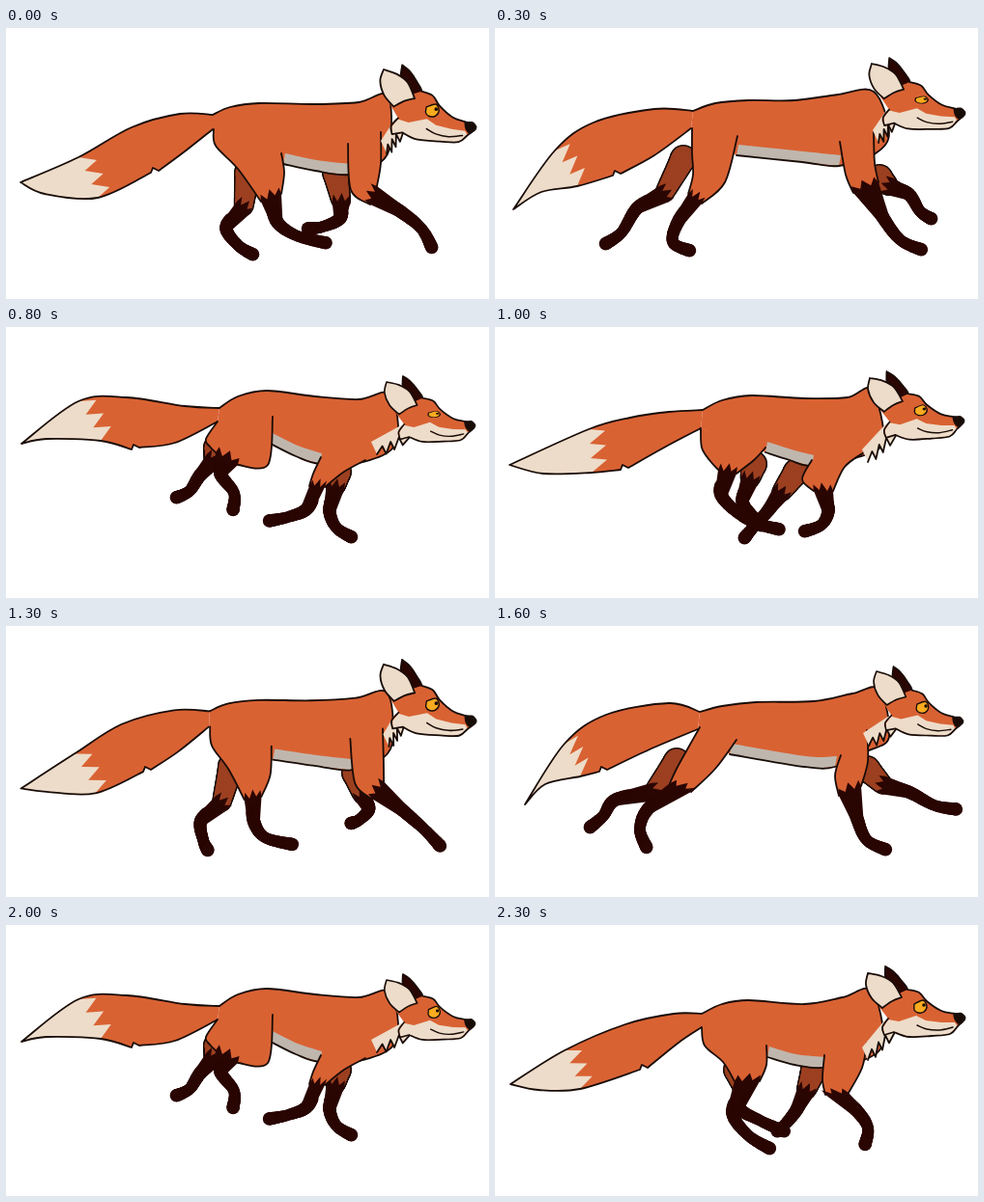
An HTML page with a canvas for the animation above (2.4 s loop, 500 by 281 pixels).

```html
<!DOCTYPE html>
<html lang="en">
<head>
<meta charset="utf-8">
<title>Running fox</title>
<style>
html, body { margin: 0; width: 100%; height: 100%; overflow: hidden; background: #fff; }
canvas { display: block; width: 500px; height: 281px; }
</style>
</head>
<body>
<canvas id="stage"></canvas>
<script>
const W = 500, H = 281, STEP = 100, FRAMES = 24, CYCLE = 12;
const ORANGE = '#d96233', BROWN = '#9c4021', DARK = '#2a0603', CREAM = '#eddcc9',
      GREY = '#bfb7ae', YELLOW = '#fbab1f', INK = '#190c07';
const canvas = document.getElementById('stage');
const ctx = canvas.getContext('2d');
const ratio = window.devicePixelRatio || 1;
canvas.width = W * ratio;
canvas.height = H * ratio;

// Key poses of one stride; "at" is the step within the stride.
// head: ear tip, nose tip. Legs: joints from the top down.
const poses = [
  { at: 0,
    tail: [214,90, 180,89, 130,103, 75,134, 15,160, 40,172, 95,176, 150,150, 185,128, 214,105],
    body: [232,82, 262,78, 320,79, 365,77, 395,70, 398,118, 387,140, 355,152, 320,148, 287,141],
    thigh: [215,105, 217,122, 240,146, 264,180, 285,172, 288,150, 285,130],
    arm: [388,108, 388,140, 384,164, 377,183, 357,168, 354,120],
    hind: [280,200, 300,215, 332,223], fore: [408,190, 430,208, 441,228],
    hind2: [250,150, 246,186, 228,206, 240,225, 256,235],
    fore2: [341,150, 347,180, 346,197, 328,206, 312,208],
    head: [391,43, 486,103], ruff: [394,130] },
  { at: 3,
    tail: [205,86, 165,84, 102,98, 62,127, 19,188, 48,170, 85,164, 122,153, 165,132, 203,104],
    body: [228,78, 262,75, 310,75, 355,69, 392,66, 408,108, 394,130, 356,143, 318,139, 250,132],
    thigh: [204,104, 204,130, 205,152, 200,172, 214,182, 238,160, 251,112],
    arm: [392,108, 393,140, 397,160, 371,171, 363,152, 357,118],
    hind: [190,200, 184,222, 202,231], fore: [402,197, 420,220, 442,230],
    hind2: [195,135, 175,172, 148,186, 131,212, 114,224],
    fore2: [398,155, 408,164, 428,172, 440,190, 452,198],
    head: [390,37, 486,88], ruff: [397,119] },
  { at: 4,
    tail: [212,89, 180,80, 115,92, 72,122, 31,185, 52,164, 88,156, 108,151, 160,128, 210,107],
    body: [235,83, 270,79, 330,78, 370,70, 398,66, 408,115, 385,130, 352,146, 320,146, 243,133],
    thigh: [212,105, 199,128, 188,148, 181,163, 203,172, 228,148, 250,118],
    arm: [385,108, 386,140, 379,166, 356,176, 352,155, 358,134],
    hind: [160,188, 150,210, 157,230], fore: [375,200, 385,222, 405,232],
    hind2: [188,140, 164,172, 125,180, 112,197, 98,209],
    fore2: [385,148, 402,165, 428,172, 455,186, 478,190],
    head: [395,47, 484,99], ruff: [387,124] },
  { at: 6,
    tail: [215,72, 175,69, 115,68, 68,92, 16,147, 45,145, 95,128, 115,120, 160,99, 200,92],
    body: [228,68, 260,64, 310,66, 355,70, 388,68, 402,112, 385,125, 325,138, 290,128, 248,118],
    thigh: [200,93, 191,118, 184,136, 160,143, 165,157, 215,150, 254,106],
    arm: [388,120, 360,135, 329,160, 307,160, 318,146, 328,122],
    hind: [140,156, 118,175, 90,178], fore: [300,190, 296,210, 310,226],
    hind2: [190,122, 178,133, 152,138, 130,153, 113,160],
    fore2: [372,140, 382,165, 405,185, 430,208, 447,220],
    head: [385,57, 484,101], ruff: [385,124] },
  { at: 8,
    tail: [221,84, 185,82, 125,73, 75,77, 16,121, 42,116, 98,118, 130,127, 175,120, 219,98],
    body: [240,72, 270,66, 320,72, 365,75, 398,70, 404,120, 370,140, 325,142, 300,134, 272,120],
    thigh: [219,98, 207,116, 211,124, 217,130, 240,143, 271,143, 276,93],
    arm: [372,138, 350,150, 330,166, 314,165, 318,152, 326,135],
    hind: [222,152, 236,172, 235,190], fore: [312,188, 292,197, 272,201],
    hind2: [218,125, 215,138, 200,155, 190,170, 176,177],
    fore2: [344,150, 341,166, 335,190, 342,208, 358,218],
    head: [394,57, 485,102], ruff: [384,132] },
  { at: 10,
    tail: [215,86, 180,88, 140,94, 97,106, 15,143, 50,152, 100,151, 130,148, 175,125, 213,105],
    body: [235,76, 265,71, 320,74, 365,73, 390,65, 402,118, 376,135, 328,144, 305,138, 280,130],
    thigh: [213,105, 214,125, 222,138, 231,148, 250,152, 268,138, 280,125],
    arm: [382,130, 362,145, 350,170, 330,170, 318,158, 328,138],
    hind: [234,174, 262,200, 295,210], fore: [345,190, 338,205, 320,212],
    hind2: [268,142, 264,158, 256,180, 266,195, 276,206],
    fore2: [312,150, 296,172, 283,190, 268,207, 258,219],
    head: [388,53, 485,97], ruff: [386,140] },
  { at: 11,
    tail: [214,92, 185,92, 135,103, 72,130, 16,165, 45,171, 88,170, 150,150, 190,122, 214,106],
    body: [235,82, 262,78, 320,82, 360,75, 390,68, 402,120, 382,140, 340,148, 310,145, 282,137],
    thigh: [214,106, 217,125, 236,142, 248,162, 274,162, 281,145, 281,125],
    arm: [385,122, 380,148, 366,174, 342,176, 339,160, 341,135],
    hind: [252,188, 275,203, 300,214], fore: [374,192, 386,210, 383,228],
    hind2: [250,150, 256,168, 246,195, 262,218, 285,232],
    fore2: [330,150, 322,172, 312,192, 300,207, 292,214],
    head: [386,50, 486,96], ruff: [386,140] }
];

const pairs = a => Array.from({ length: a.length / 2 }, (_, i) => [a[2 * i], a[2 * i + 1]]);
const mix = (a, b, t) => [a[0] + (b[0] - a[0]) * t, a[1] + (b[1] - a[1]) * t];
const add = (a, b, k = 1) => [a[0] + b[0] * k, a[1] + b[1] * k];
function unit(a, b) {
  const x = b[0] - a[0], y = b[1] - a[1], l = Math.hypot(x, y) || 1;
  return [x / l, y / l];
}

// Cyclic cubic blend of the key poses.
function poseAt(step) {
  const n = poses.length;
  const key = i => poses[(i + n) % n];
  const time = i => key(i).at + Math.floor(i / n) * CYCLE;
  let i = n - 1;
  while (poses[i].at > step) i--;
  const h = time(i + 1) - time(i), t = (step - time(i)) / h;
  const t2 = t * t, t3 = t2 * t, s = 3 * t2 - 2 * t3;
  const out = {};
  for (const part in poses[0]) {
    if (part === 'at') continue;
    out[part] = pairs(key(i)[part].map((v, k) => {
      const prev = key(i - 1)[part][k], next = key(i + 1)[part][k], after = key(i + 2)[part][k];
      const m0 = (next - prev) / (time(i + 1) - time(i - 1));
      const m1 = (after - v) / (time(i + 2) - time(i));
      return v + (next - v) * s + h * (m0 * (t3 - 2 * t2 + t) + m1 * (t3 - t2));
    }));
  }
  return out;
}

// Smooth open curve through points, joined to the current path.
function curve(path, p, join) {
  join ? path.lineTo(...p[0]) : path.moveTo(...p[0]);
  for (let i = 0; i < p.length - 1; i++) {
    const a = p[i - 1] || p[i], b = p[i], c = p[i + 1], d = p[i + 2] || c;
    path.bezierCurveTo(b[0] + (c[0] - a[0]) / 6, b[1] + (c[1] - a[1]) / 6,
      c[0] - (d[0] - b[0]) / 6, c[1] - (d[1] - b[1]) / 6, c[0], c[1]);
  }
  return path;
}
const smooth = list => curve(new Path2D(), Array.isArray(list[0]) ? list : pairs(list));
function poly(points) {
  const path = new Path2D();
  points.forEach(p => path.lineTo(...p));
  return path;
}
function fill(path, color) {
  ctx.fillStyle = color;
  ctx.fill(path);
}
function line(path, width = 1.8) {
  ctx.lineWidth = width;
  ctx.stroke(path);
}
function dot(p, r, color) {
  const path = new Path2D();
  path.arc(p[0], p[1], r, 0, 7);
  fill(path, color);
}
function taper(p, r, color, from = 0) {
  for (let i = 0; i < p.length - 1; i++) {
    const a = p[i - 1] || p[i], b = p[i], c = p[i + 1], d = p[i + 2] || c;
    for (let t = 0; t <= 1; t += 0.05) {
      if (i + t < from) continue;
      const at = k => 0.5 * (2 * b[k] + (c[k] - a[k]) * t +
        (2 * a[k] - 5 * b[k] + 4 * c[k] - d[k]) * t * t +
        (3 * b[k] - a[k] - 3 * c[k] + d[k]) * t * t * t);
      dot([at(0), at(1)], r[i] + (r[i + 1] - r[i]) * t, color);
    }
  }
}

// Dark lower leg with a jagged upper edge from a to b.
function sock(a, b, joints) {
  const top = mix(a, b, 0.5), p = [top, ...joints];
  const up = unit(joints[0], top);
  let side = [-up[1], up[0]];
  if ((b[0] - a[0]) * side[0] + (b[1] - a[1]) * side[1] < 0) side = [up[1], -up[0]];
  const tip = (t, h) => add(mix(a, b, t), up, h);
  fill(poly([a, tip(0.05, 7), tip(0.3, 0), tip(0.5, 9), tip(0.7, 1), tip(0.95, 7), b,
    add(joints[0], side, 6.5), add(joints[0], side, -6.5)]), DARK);
  taper(p, [7, 6.8, 5.8, 6.8], DARK, 0.65);
}

function farLeg(p) {
  const [top, knee, ...rest] = p;
  taper([top, knee], [14, 10], INK);
  taper([top, knee], [12.4, 8.6], BROWN);
  const d = unit(knee, rest[0]), n = [-d[1], d[0]];
  sock(add(knee, n, 9.5), add(knee, n, -9.5), rest);
}

function nearLeg(p, split, joints) {
  const path = smooth(p.slice(0, split));
  curve(path, p.slice(split), true);
  fill(path, ORANGE);
  line(smooth(p.slice(0, split)));
  line(smooth(p.slice(split)));
  sock(p[split - 1], p[split], joints);
}

function drawTail(t) {
  const path = smooth(t.slice(0, 5));
  curve(path, t.slice(4, 8), true);
  const tuft = add(t[7], [2, -5]);
  path.lineTo(...tuft);
  curve(path, [add(t[7], [8, -2]), t[8], t[9]], true);
  fill(path, ORANGE);
  const a = t[3], b = t[6], d = unit(t[4], mix(a, b, 0.5));
  const edge = [add(a, unit(b, a), 6), a];
  for (let i = 0; i < 3; i++) {
    edge.push(add(mix(a, b, (i + 0.3) / 3), d, 17), mix(a, b, (i + 1) / 3));
  }
  edge.push(add(b, unit(a, b), 6), add(b, d, -140), add(a, d, -140));
  ctx.save();
  ctx.clip(path);
  fill(poly(edge), CREAM);
  ctx.restore();
  line(path);
}

function drawBody(p) {
  const outline = [p.tail[0], ...p.body];
  const path = smooth(outline);
  path.lineTo(...p.tail[9]);
  fill(path, ORANGE);
  const belly = p.body.slice(7);
  const under = smooth(belly);
  curve(under, belly.map(q => add(q, [2, -11])).reverse(), true);
  fill(under, GREY);
  line(smooth(outline));
}

// Similarity transform that puts the drawn head's ear and nose in place.
function headMap([ear, nose]) {
  const x = nose[0] - ear[0], y = nose[1] - ear[1], u = 100, v = 46, l = u * u + v * v;
  const a = (x * u + y * v) / l, b = (y * u - x * v) / l;
  return [a, b, -b, a, ear[0] - a * 386 + b * 50, ear[1] - b * 386 - a * 50];
}

function drawRuff(m, tip) {
  const put = (x, y) => [m[0] * x + m[2] * y + m[4], m[1] * x + m[3] * y + m[5]];
  const chin = put(414, 111), cheek = put(404, 98);
  const edge = [add(tip, [-6, -13]), tip];
  for (let i = 1; i < 4; i++) {
    const q = mix(tip, chin, i / 4);
    edge.push(add(q, [-3, -4]), add(q, [1, 4]));
  }
  edge.push(chin);
  fill(poly([...edge, cheek]), CREAM);
  line(poly(edge.slice(1)));
}

function drawHead(m, open) {
  ctx.save();
  ctx.transform(...m);
  const farEar = smooth([404,43, 412,48, 421,58, 427,68, 416,77, 405,60, 404,43]);
  fill(farEar, DARK);
  line(farEar);
  const profile = [427,67, 439,70, 447,79, 462,89, 476,92, 485,94, 486,98, 479,105,
    471,113, 452,115, 428,116, 413,111];
  const face = smooth(profile);
  curve(face, pairs([403,114, 401,106, 407,97]), true);
  const skin = new Path2D(face);
  skin.lineTo(397, 84);
  skin.lineTo(416, 72);
  fill(skin, ORANGE);
  fill(poly(pairs([407,98, 418,100, 436,94, 446,99, 462,101, 476,101, 479,105, 471,113,
    452,115, 428,116, 413,111, 403,114, 402,106])), CREAM);
  line(face);
  const ear = smooth([386,50, 384,62, 390,76, 401,86]);
  curve(ear, pairs([401,86, 411,79, 421,75]), true);
  curve(ear, pairs([421,75, 412,60, 400,53, 386,50]), true);
  fill(ear, CREAM);
  line(ear);
  fill(smooth([474,92, 483,91, 487,97, 481,103, 476,99, 474,92]), INK);
  line(smooth([437,104, 447,108, 460,109, 474,106]), 1.5);
  ctx.translate(440, 85);
  ctx.scale(1, open);
  const eye = smooth([-6,-3, 3,-7, 7,-1, 4,5, -2,6, -6,3, -6,-3]);
  fill(eye, YELLOW);
  line(eye, 1.4);
  dot([4, -2], 1.8, INK);
  ctx.restore();
}

function draw(frame) {
  const p = poseAt(frame % CYCLE);
  const open = Math.min(1, 0.15 + Math.abs(frame - 5.6) * 0.16);
  ctx.setTransform(ratio, 0, 0, ratio, 0, 0);
  ctx.fillStyle = '#fff';
  ctx.fillRect(0, 0, W, H);
  ctx.lineJoin = ctx.lineCap = 'round';
  ctx.strokeStyle = INK;
  farLeg(p.fore2);
  farLeg(p.hind2);
  drawTail(p.tail);
  drawBody(p);
  nearLeg(p.thigh, 4, p.hind);
  nearLeg(p.arm, 3, p.fore);
  const m = headMap(p.head);
  drawRuff(m, p.ruff[0]);
  drawHead(m, open);
}

const start = performance.now();
function tick() {
  draw(Math.floor((performance.now() - start) / STEP) % FRAMES);
  requestAnimationFrame(tick);
}
tick();
</script>
</body>
</html>
```
